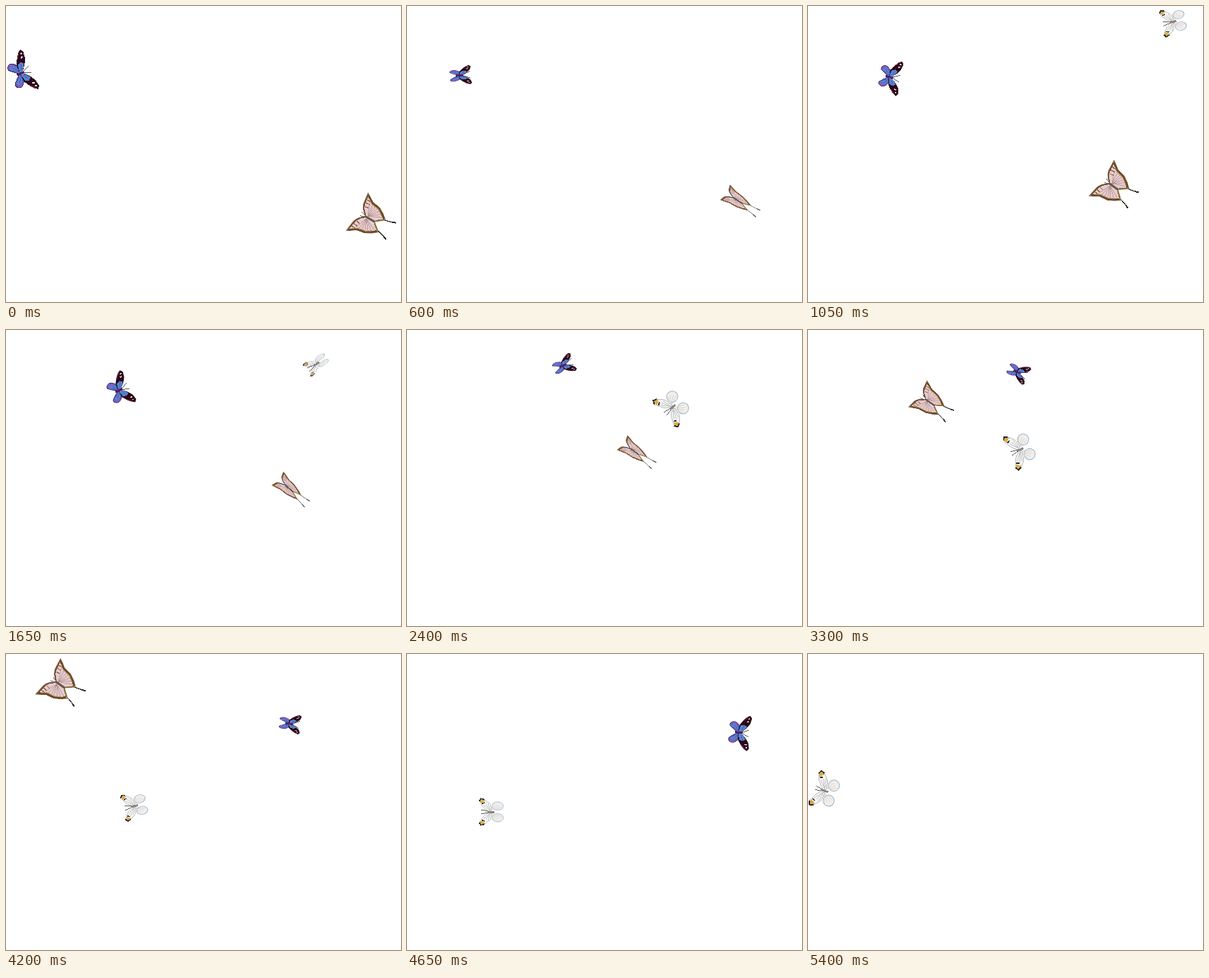
Recreate the animation shown at these times as an HTML page. Size 560x420 px, loop 5.55 s.

```html
<!DOCTYPE html>
<html lang="en">
<head>
<meta charset="utf-8">
<title>Butterflies</title>
<style>
  html, body { margin: 0; width: 100%; height: 100%; overflow: hidden; background: #fff; }
  svg { display: block; width: 560px; height: 420px; shape-rendering: crispEdges; }
</style>
</head>
<body>
<svg viewBox="0 0 560 420" fill="none"></svg>
<script>
const STEP = 150, STEPS = 37;
const svg = document.querySelector('svg');

const path = (d, stroke = 'none', width = 1, fill = 'none') =>
  `<path d="${d}" stroke="${stroke}" stroke-width="${width}" fill="${fill}"/>`;

// n veins from the wing root, between two angles in degrees
function veins(n, from, to, length, color) {
  let d = '';
  for (let i = 0; i < n; i++) {
    const a = (from + (to - from) * i / (n - 1)) * Math.PI / 180;
    d += `M0 2L${length * Math.cos(a)} ${length * Math.sin(a)}`;
  }
  return path(d, color, .7);
}

const body = (back, color, width, feelers, reach, spread) =>
  path(`M${-back} 0H4`, color, width) +
  path(`M4-1L${reach} ${-spread}M4 1L${reach} ${spread}`, feelers, .8);

// Heads point to +x; each wing is drawn once and mirrored.
// keys: [step, x, y, heading]; beat: steps per wing beat, open: step of widest spread
const flies = [
  {
    beat: 7, open: -.5,
    keys: [[0, 512, 300, -150], [7, 429.5, 253.5, -145], [11, 397.5, 221.5, -139],
      [16, 318.5, 169.5, -144], [22, 169, 100, -145], [28, 73, 41, -145], [30, 27, 24, -145]],
    wing: path('M-22 9Q-29 10-39 14', '#33271f', 1.3) + path('M-34 12L-39 14', '#2b2830', 2) +
      path('M3 1Q12 7 14 15L16 31Q9 27 4 23L-8 21L-17 16L-24 10L-13 1Z', '#604529', 1, '#e6cbd2') +
      veins(7, 70, 150, 21, '#a98a80') +
      path('M15 29L4 22L-8 20L-16 15L-22 10', '#6b4b2c', 3) +
      path('M11 25L4 20L-8 18L-16 13', '#c99a58') +
      path('M4 2Q12 8 13 16L15 29', '#795533', 2) +
      path('M10 12L5 13M13 17L6 18M13 22L7 22', '#80603c', 1.2) +
      path('M-13 2L-22 9', '#8a7430', 2),
    body: body(13, '#66594d', 2, '#3a5068', 10, 3)
  },
  {
    beat: 6, open: 0,
    keys: [[0, 22, 95, -25], [7, 117, 101, 10], [11, 161.5, 85, -26],
      [16, 222.5, 50, -23], [22, 298, 60, 25], [28, 403, 99, 7], [34, 541, 124, 5]],
    wing: path('M0 1L-2 12Q-6 18-10 18Q-16 16-15 11Q-12 7-4 1Z', '#42195e', 1, '#5c7fd0') +
      path('M-4 13Q-8 16-12 14L-13 11', '#9050b8', 2) +
      veins(3, 110, 145, 14, '#3a4fa8') +
      path('M1 1Q9 8 13 17L14.5 26L12 29.5Q7 27 3 20L-1 13L-2 2Z', '#2b0618', 1, '#2b0618') +
      path('M1 1Q6 5 9 11L5 14L0 12L-2 2Z', 'none', 0, '#4f86d0') +
      path('M2 4L5 12', '#7a48b8') + path('M3 20L10 28', '#7c2848') +
      path('M8 19L11 20M10 24L12 25', '#e8dcf0', 2),
    body: body(7, '#552064', 3, '#263047', 13, 5)
  },
  {
    beat: 7, open: 1.5,
    keys: [[6, 536, 16, 174], [11, 439, 49, 145], [16, 376, 110, 137],
      [22, 300, 170, 156], [28, 181, 216, 167], [31, 118, 224, 180], [36, 23, 194, 199]],
    wing: '<circle cx="-10.5" cy="11.5" r="8" fill="#f3eeea" stroke="#91b5d0"/>' +
      veins(4, 110, 150, 18, '#d5ccc6') +
      path('M2 1Q10 7 14 17L15.500 23L13 26Q5 23 0 15L-2 3Z', '#a4afb8', .8, '#f6f4f1') +
      veins(3, 55, 80, 17, '#b3b1b0') +
      path('M13 17L15 23L12 25L7 22Z', 'none', 0, '#d9ab48') +
      path('M15.500 21L13 26L8 24M12 16L8 18', '#29292c', 1.8),
    body: body(6, '#8c8580', 3, '#303238', 13, 3)
  }
];

for (const fly of flies) {
  svg.insertAdjacentHTML('beforeend',
    `<g><g>${fly.wing}<g transform="scale(1 -1)">${fly.wing}</g></g>${fly.body}</g>`);
  fly.node = svg.lastElementChild;
}

function pose(keys, step) {
  const i = keys.findIndex(key => key[0] >= step);
  if (i < 0 || step < keys[0][0]) return null;
  const b = keys[i], a = keys[Math.max(0, i - 1)];
  const p = a === b ? 1 : (step - a[0]) / (b[0] - a[0]);
  return a.map((v, n) => v + (b[n] - v) * p);
}

function draw(now) {
  const step = Math.floor(now / STEP) % STEPS;
  for (const { node, keys, beat, open } of flies) {
    const at = pose(keys, step);
    node.style.display = at ? '' : 'none';
    if (!at) continue;
    const [, x, y, heading] = at;
    const spread = .64 + .38 * Math.cos(2 * Math.PI * (step - open) / beat);
    node.setAttribute('transform', `translate(${x} ${y}) rotate(${heading})`);
    node.firstChild.setAttribute('transform', `scale(1 ${spread})`);
  }
}

const start = performance.now();
function tick() {
  draw(performance.now() - start);
  requestAnimationFrame(tick);
}
tick();
</script>
</body>
</html>
```
